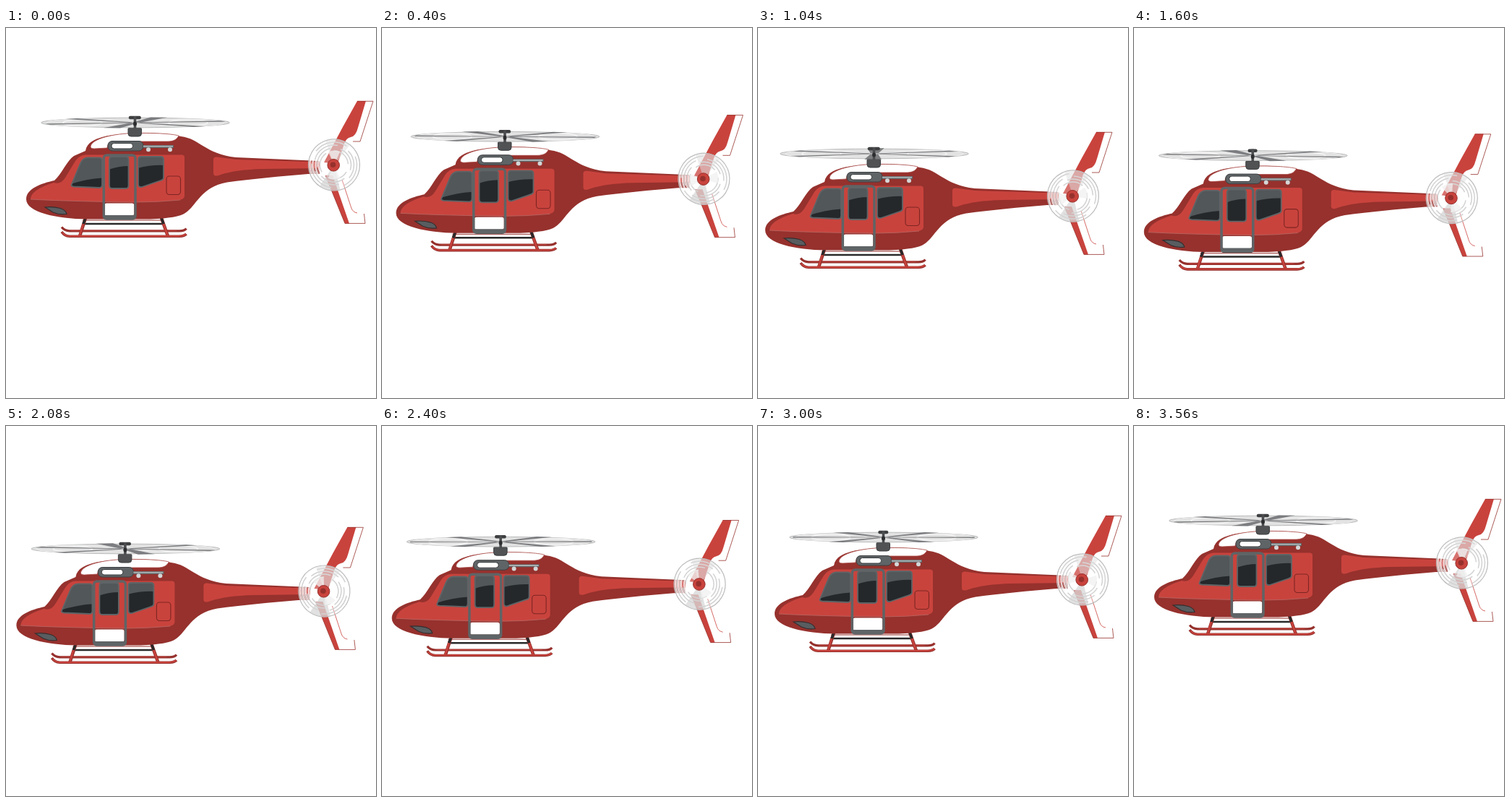
An HTML page with a canvas for the animation above (3600 ms loop, 512 by 512 pixels).

```html
<!DOCTYPE html>
<html lang="en">
<head>
<meta charset="utf-8">
<title>Helicopter</title>
<style>
html, body { margin: 0; width: 100%; height: 100%; overflow: hidden; background: #fff; }
canvas { display: block; width: 512px; height: 512px; }
</style>
</head>
<body>
<canvas id="stage" width="512" height="512"></canvas>
<script>
const ctx = document.getElementById('stage').getContext('2d');
const LOOP = 3600, STEP = 40, CYCLE = LOOP - STEP;
const RED = '#c9433d', DARK = '#96312d', LINE = '#7d2623';
const STEEL = '#5f6466', GLASS = '#24282b', SHEEN = '#52575a';

// Hover path: time, x, y
const HOVER = [
  [0, 0, 0], [400, -8.5, 19.3], [560, -12, 27], [880, -18.4, 39.8], [1040, -18, 43],
  [1160, -17, 44.3], [1400, -15, 44.8], [1700, -14, 45.3], [2080, -13.6, 39],
  [2240, -13.8, 34], [2600, -15, 23.6], [2680, -14.7, 23], [2800, -12, 23],
  [3000, -5, 23], [3160, -1.6, 19.5], [3360, 0, 11], [CYCLE, 0, 0]
];

function slope(i, axis) {
  const a = HOVER[Math.max(i - 1, 0)], b = HOVER[Math.min(i + 1, HOVER.length - 1)];
  return (b[axis] - a[axis]) / (b[0] - a[0]);
}

function hover(t, axis) {
  let i = 0;
  while (i < HOVER.length - 2 && t > HOVER[i + 1][0]) i++;
  const a = HOVER[i], b = HOVER[i + 1], span = b[0] - a[0];
  const u = (t - a[0]) / span, v = 1 - u;
  return v * v * (1 + 2 * u) * a[axis] + u * u * (3 - 2 * u) * b[axis] +
    span * u * v * (v * slope(i, axis) - u * slope(i + 1, axis));
}

function shape(d, fill, stroke, width = 1) {
  const path = new Path2D(d);
  if (fill) { ctx.fillStyle = fill; ctx.fill(path); }
  if (stroke) { ctx.strokeStyle = stroke; ctx.lineWidth = width; ctx.stroke(path); }
}

function box(x, y, w, h, r, fill, stroke, width = 1) {
  ctx.beginPath();
  ctx.roundRect(x, y, w, h, r);
  if (fill) { ctx.fillStyle = fill; ctx.fill(); }
  if (stroke) { ctx.strokeStyle = stroke; ctx.lineWidth = width; ctx.stroke(); }
}

function oval(x, y, rx, ry, fill, stroke, width = 1) {
  ctx.beginPath();
  ctx.ellipse(x, y, rx, ry, 0, 0, 2 * Math.PI);
  if (fill) { ctx.fillStyle = fill; ctx.fill(); }
  if (stroke) { ctx.strokeStyle = stroke; ctx.lineWidth = width; ctx.stroke(); }
}

function pane(d, sheen) {
  shape(d, GLASS);
  ctx.save();
  ctx.clip(new Path2D(d));
  shape(sheen, SHEEN);
  ctx.restore();
  shape(d, null, STEEL, 1.8);
}

function drawFins() {
  shape('M486 101H508L490 157H481L472 164L461 190L440 185L466 137Z', '#fff');
  shape('M486 101H498L487 138Q484 150 477 151Q471 152 468 160L459 188L440 186L466 137Z', RED);
  shape('M486 101.3H508L490 157H480', null, DARK, .8);
  shape('M444 205L462 203L477 247Q480 256 487 256L495 258L497 270H470Z', '#fff');
  shape('M442 204L452 204L475 270.5H469Z', RED);
  shape('M442 204L469 270.4H497L495.5 257', null, DARK, .8);
  shape('M465 210L477.5 248Q479.5 255 486 256', null, RED, .8);
}

function drawSkids() {
  shape('M106 266H216', null, DARK, 1);
  shape('M106 271H218', null, '#29292a', 2.5);
  shape('M77 275.5Q81 280.5 88 280.8H240Q247 280.8 249.5 277.5', null, DARK, 3.2);
  shape('M90 280.3H236', null, RED, .8);
  shape('M111 260L102 288M214 260L224 288', null, DARK, 4.5);
  shape('M107 271L102 287M218 271L223.5 287', null, RED, 2.5);
  shape('M111 260L107 271M214 260L218 271', null, '#29292a', 3.5);
  shape('M77 282Q81 288 88 288.3H240Q247 288 249.5 285', null, DARK, 3.6);
  shape('M78 283Q82 288 88 288H239Q246 287.7 249 285.3', null, RED, 1.8);
}

function drawBody() {
  shape('M28 237C28 222 49 215 67 211C77 202 84 184 94 177L110 170C112 158 123 154 133 151' +
    'C162 143 221 144 242 150C268 153 275 174 318 179L434 184V202L418 202C380 205 340 209 306 213.5' +
    'C269 220 264 246 248 256Q238 263 200 264.5H112C70 264 28 255 28 237Z', DARK);
  shape('M34 237Q34 224 66 214Q76 217 82 207L96 184Q101 176 110 175.5H243Q247 175.5 247 179' +
    'V233Q246 237 240 238Q210 241 178 241Q90 240 34 237Z', RED);
  shape('M34 237Q90 240 178 241Q210 241 241 238', null, '#b86a66', .8);
  shape('M287 182Q287 178 292 178.5L318 182L434 185.5V194L355 195Q318 196 297 203' +
    'Q287 207 287 201Z', RED);

  shape('M117 164C119 153 149 146 178 145.5C209 145 230 146.5 239 149C236 155 231 157 223 157' +
    'H148Q141 157 140 166L122 167Q117 167 117 164Z', '#fff', '#a94a46', .8);
  box(141, 156.5, 49, 13.5, 6, STEEL, '#3c4042');
  box(146, 159.5, 29.5, 7.5, 3.5, '#fff', '#34383a');
  shape('M190 164H232', null, STEEL, 4);
  shape('M190 163.7H231', null, '#a9afb1', 2);
  oval(197, 168.2, 3, 3, '#d4d6d7');
  oval(227, 168.2, 3, 3, '#d4d6d7');

  pane('M91 216L103 187Q106 180 113 179.3H129Q133 179.3 133 183V217Q133 221 129 221L94 219.5Q89 219 91 216Z',
    'M80 170H140V207Q112 208 86 217Z');
  box(136.3, 242.5, 41, 17, 3, '#fff');
  box(135.3, 176, 43.7, 88, 4, null, STEEL, 3.5);
  shape('M136 261.5H178', null, STEEL, 5);
  pane('M147 178H166Q169.5 178 169.5 182V218Q169.5 222 166 222H147Q143 222 143 218V182Q143 178 147 178Z',
    'M142 176H171V191Q155 191 142 196Z');
  pane('M187 178H214Q218 178 218 182V207Q218 210 214 211L188 220Q183 221 183 216V182Q183 178 187 178Z',
    'M182 176H220V190Q200 189 182 194Z');
  box(222, 205, 19.5, 25.5, 4, null, LINE, 1.1);
  shape('M54 248Q66 247 75 249.5Q83 252 84 257.5Q74 259 65 255Z', '#585d60', '#352e2f', 1.2);
}

function drawTailRotor(phase) {
  const fan = (angle, spread, radius, color) => {
    ctx.beginPath();
    ctx.moveTo(0, 0);
    ctx.arc(0, 0, radius, angle - spread, angle + spread);
    ctx.fillStyle = color;
    ctx.fill();
  };
  ctx.save();
  ctx.translate(454, 189.5);
  oval(0, 0, 36, 36, 'rgba(255,255,255,.25)');
  for (let i = 0; i < 5; i++) {
    const r = 35.5 - i * 4;
    for (let k = 0; k < 3; k++) {
      const start = phase + i * 1.7 + k * 2.1;
      ctx.beginPath();
      ctx.arc(0, 0, r, start, start + (i ? 1.5 : 2.1));
      ctx.strokeStyle = i ? '#d2d2d2' : '#bcbcbc';
      ctx.lineWidth = i ? 1.5 : 1.2;
      ctx.stroke();
    }
    // Pale gaps show only across the boom
    ctx.beginPath();
    ctx.arc(0, 0, r - 1.9, 2.6, 3.7);
    ctx.strokeStyle = 'rgba(255,255,255,.75)';
    ctx.lineWidth = 2;
    ctx.stroke();
  }
  fan(-1.4, .5, 35, 'rgba(222,222,222,.5)');
  fan(1.75, .42, 35, 'rgba(212,212,212,.7)');
  for (let k = 0; k < 2; k++) fan(phase + 1.57 + k * Math.PI, .42, 20, 'rgba(240,240,240,.75)');
  ctx.restore();
  oval(453.2, 189.8, 8.3, 8.3, RED, DARK, 1);
  oval(452.5, 189.2, 3.8, 3.8, DARK);
}

function drawMainRotor(phase) {
  box(169, 138.5, 18.5, 11.5, [1, 1, 4, 4], '#505254', '#3b3d3f');
  oval(179, 131, 130.5, 6.8, 'rgba(222,223,223,.88)', '#b9baba', 1);
  for (const side of [-1, 1]) {
    oval(179 + side * 73, 131, 27, 4.3, null, '#f5f5f5', 1.5);
    oval(179 + side * 73, 131, 50, 5, null, '#eeeeee', 1);
  }
  ctx.save();
  ctx.translate(179, 131);
  ctx.scale(131, 8);
  ctx.rotate(phase + Math.PI / 4);
  const blades = 6;
  for (let k = 0; k < blades; k++) {
    shape('M.05 -.04L.96 -.09V.09L.05 .04Z', 'rgba(108,109,112,.85)');
    ctx.rotate(2 * Math.PI / blades);
  }
  ctx.restore();
  const cap = 6.5 + 2 * Math.abs(Math.cos(phase));
  box(178.3 - cap, 121.8, 2 * cap, 4.5, 2, '#3d3f40');
  box(176.7, 122, 3.6, 17, 0, '#4b4d4f');
  oval(178.5, 132.5, 2.5, 3, '#2c2e2f');
}

function draw(now) {
  const t = Math.floor((now % LOOP) / STEP) * STEP;
  const turn = 2 * Math.PI * t / CYCLE;
  ctx.fillStyle = '#fff';
  ctx.fillRect(0, 0, 512, 512);
  ctx.save();
  ctx.translate(hover(t, 1), hover(t, 2));
  drawFins();
  drawSkids();
  drawBody();
  drawTailRotor(turn * 11);
  drawMainRotor(turn * 5);
  ctx.restore();
}

const start = performance.now();
function tick() {
  draw(performance.now() - start);
  requestAnimationFrame(tick);
}
tick();
</script>
</body>
</html>
```
